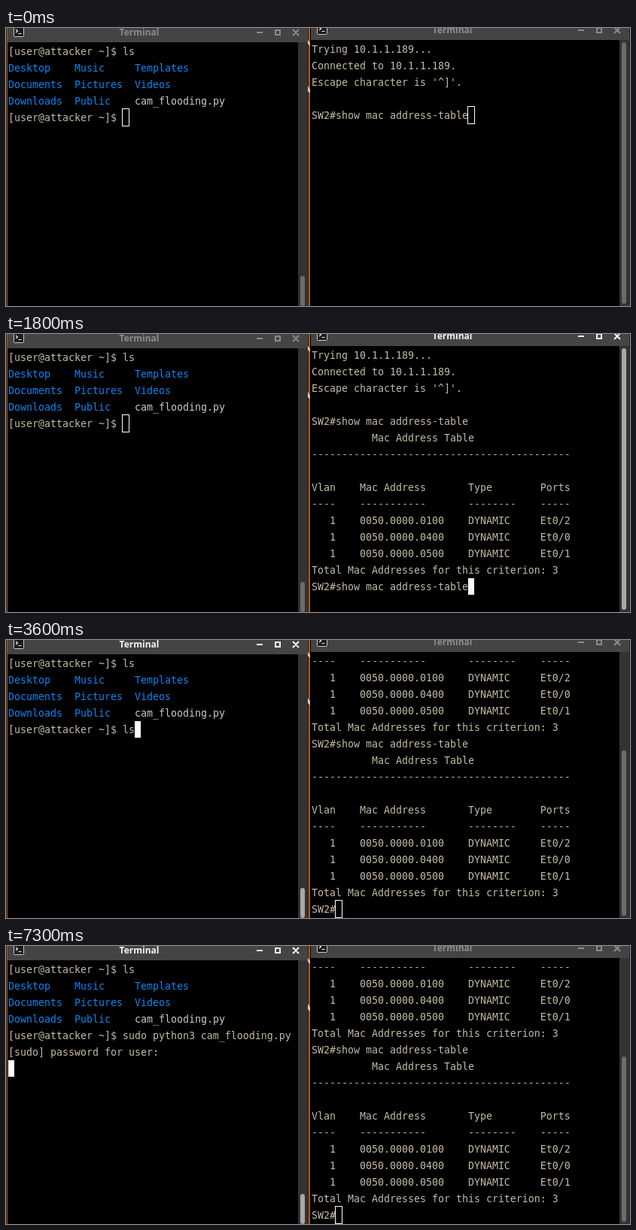
An HTML page for the animation above (8 s loop, 829 by 370 pixels).

```html
<!DOCTYPE html>
<html lang="en">
<head>
<meta charset="utf-8">
<title>Terminals</title>
<style>
html, body { margin: 0; width: 100%; height: 100%; overflow: hidden; background: #000; }
svg { display: block; width: 829px; height: 370px; }
text { white-space: pre; }
.mono { font: 13.29px "DejaVu Sans Mono", monospace; }
.title { font: bold 12px "Noto Sans", sans-serif; text-anchor: middle; }
</style>
</head>
<body>
<svg id="stage" viewBox="0 0 829 370"></svg>
<script>
const LOOP = 8000, CELL = 8, ROW = 22;
const FG = '#c4b9a4', DASH = '#a3b1b5', BLUE = '#0f83ee', PLAIN = '#c9c9c5';
const stage = document.getElementById('stage');

const rect = (x, y, w, h, fill, extra = '') =>
  `<rect x="${x}" y="${y}" width="${w}" height="${h}" fill="${fill}" ${extra}/>`;
const path = (d, color, width) =>
  `<path d="${d}" fill="none" stroke="${color}" stroke-width="${width}"/>`;
const mix = (a, b, k) => {
  const v = Math.round(a + (b - a) * k);
  return `rgb(${v},${v},${v})`;
};

// Lay out strings by column: cols(col, text, col, text, ...)
function cols(...parts) {
  let s = '';
  for (let i = 0; i < parts.length; i += 2) s = s.padEnd(parts[i]) + parts[i + 1];
  return s;
}
const entry = (mac, port) =>
  cols(3, '1', 8, `0050.0000.${mac}`, 26, 'DYNAMIC', 38, port);

const PROMPT = 'SW2#', SHOW = 'show mac address-table';
const table = [
  cols(10, 'Mac Address Table'),
  '-'.repeat(43),
  '',
  cols(0, 'Vlan', 8, 'Mac Address', 26, 'Type', 38, 'Ports'),
  cols(0, '----', 8, '-----------', 26, '--------', 38, '-----'),
  entry('0100', 'Et0/2'),
  entry('0400', 'Et0/0'),
  entry('0500', 'Et0/1'),
  'Total Mac Addresses for this criterion: 3'
];
const intro = ['Trying 10.1.1.189...', 'Connected to 10.1.1.189.', "Escape character is '^]'.", ''];

const USER = '[user@attacker ~]$ ';
const listing = [
  ['Desktop', 'Music', 'Templates'],
  ['Documents', 'Pictures', 'Videos'],
  ['Downloads', 'Public', 'cam_flooding.py']
].map(([a, b, c]) => cols(0, a, 11, b, 21, c));

function leftLines(t) {
  const lines = [USER + 'ls', ...listing];
  if (t < 3600) return [...lines, USER];
  if (t < 3800) return [...lines, USER + 'ls'];
  lines.push(USER + 'sudo python3 cam_flooding.py');
  if (t < 4900) return [...lines, ''];
  lines.push('[sudo] password for user: ');
  return t < 7300 ? lines : [...lines, ''];
}

function rightLines(t) {
  const lines = [...intro, PROMPT + SHOW];
  if (t < 800) return lines;
  lines.push(...table);
  if (t < 1800) return [...lines, PROMPT];
  lines.push(PROMPT + SHOW);
  if (t < 2300) return lines;
  return [...lines, ...table, PROMPT].slice(-16);
}

function words(line, x, y) {
  const dirs = listing.includes(line);
  if (!dirs) {
    const fill = /^[- ]+$/.test(line) ? DASH : FG;
    return `<text class="mono" x="${x}" y="${y}" fill="${fill}">${line}</text>`;
  }
  return [...line.matchAll(/\S+/g)].map(m =>
    `<text class="mono" x="${x + m.index * CELL}" y="${y}" fill="${m[0].endsWith('.py') ? PLAIN : BLUE}">${m[0]}</text>`
  ).join('');
}

function screen(lines, x, y, focus) {
  const cx = x + lines[lines.length - 1].length * CELL;
  const cy = y + (lines.length - 1) * ROW;
  const cursor = focus
    ? rect(cx, cy, CELL, ROW, '#fff')
    : rect(cx - .5, cy - .5, CELL + 1, ROW + 1, 'none', 'stroke="#fff"');
  return lines.map((l, i) => words(l, x, y + i * ROW + 16)).join('') + cursor;
}

// Title bar; y is the centre line of its buttons
function bar(x, w, h, y, mid, icon, buttons, focus) {
  const ink = focus ? '#f4f4f4' : '#8c8c8c';
  const [a, b, c] = [0, 24, 48].map(d => buttons + d);
  return rect(x, 0, w, h, '#444') +
    rect(icon + .5, y - 7.5, 13, 13, '#1c1c1c', 'stroke="#c8c8c8" rx="1"') +
    path(`M${icon + 3} ${y - 4}l2.5 2l-2.5 2M${icon + 6.5} ${y + 1.5}h4`, '#eee', 1.2) +
    `<text class="title" x="${mid}" y="${y + 4}" fill="${ink}">Terminal</text>` +
    path(`M${a - 4} ${y}h8M${b - 3} ${y - 3}h6v6h-6zM${c - 4} ${y - 4}l8 8m0 -8l-8 8`, ink, 2);
}

const scroll = (x, y, h, thumbY, thumbH, level) =>
  rect(x, y, 13, h, '#333') +
  rect(x + 3, thumbY, 6, thumbH, mix(108, 168, level), 'rx="3"');

// Focus fades in 100 ms steps
const fade = (t, start, steps) =>
  Math.max(0, Math.min(1, (Math.floor((t - start) / 100) + 1) / steps));

function draw(t) {
  const left = t >= 3300, right = t >= 200 && !left;
  const leftGlow = fade(t, 3300, 4), rightGlow = fade(t, 200, 3) - leftGlow;
  const scrolled = t >= 2300;
  return rect(0, 0, 829, 370, '#000') +
    rect(0, 0, 1, 370, '#20242c') + rect(1, 0, 1, 370, '#b3571d') +
    rect(401, 0, 1, 370, '#24211f') + rect(402, 0, 2, 370, '#b3571d') +
    '<path d="M401 16l3 4v4l-3 -3zM401 77l3 5v5l-3 -3z" fill="#ccc"/>' +
    bar(2, 399, 19, 6, 177, 10, 337, left) +
    scroll(388, 19, 351, 330, 40, leftGlow) +
    screen(leftLines(t), 3, 20, left) +
    bar(405, 423, 16, 3, 593, 413, 764, right) +
    scroll(815, 16, 354, scrolled ? 147 : 19, scrolled ? 220 : 348, rightGlow) +
    rect(828, 0, 1, 370, '#1b2a40') +
    screen(rightLines(t), 406, 17, right);
}

let shown = '';
const start = performance.now();
function tick() {
  const markup = draw((performance.now() - start) % LOOP);
  if (markup !== shown) stage.innerHTML = shown = markup;
  requestAnimationFrame(tick);
}
tick();
</script>
</body>
</html>
```
